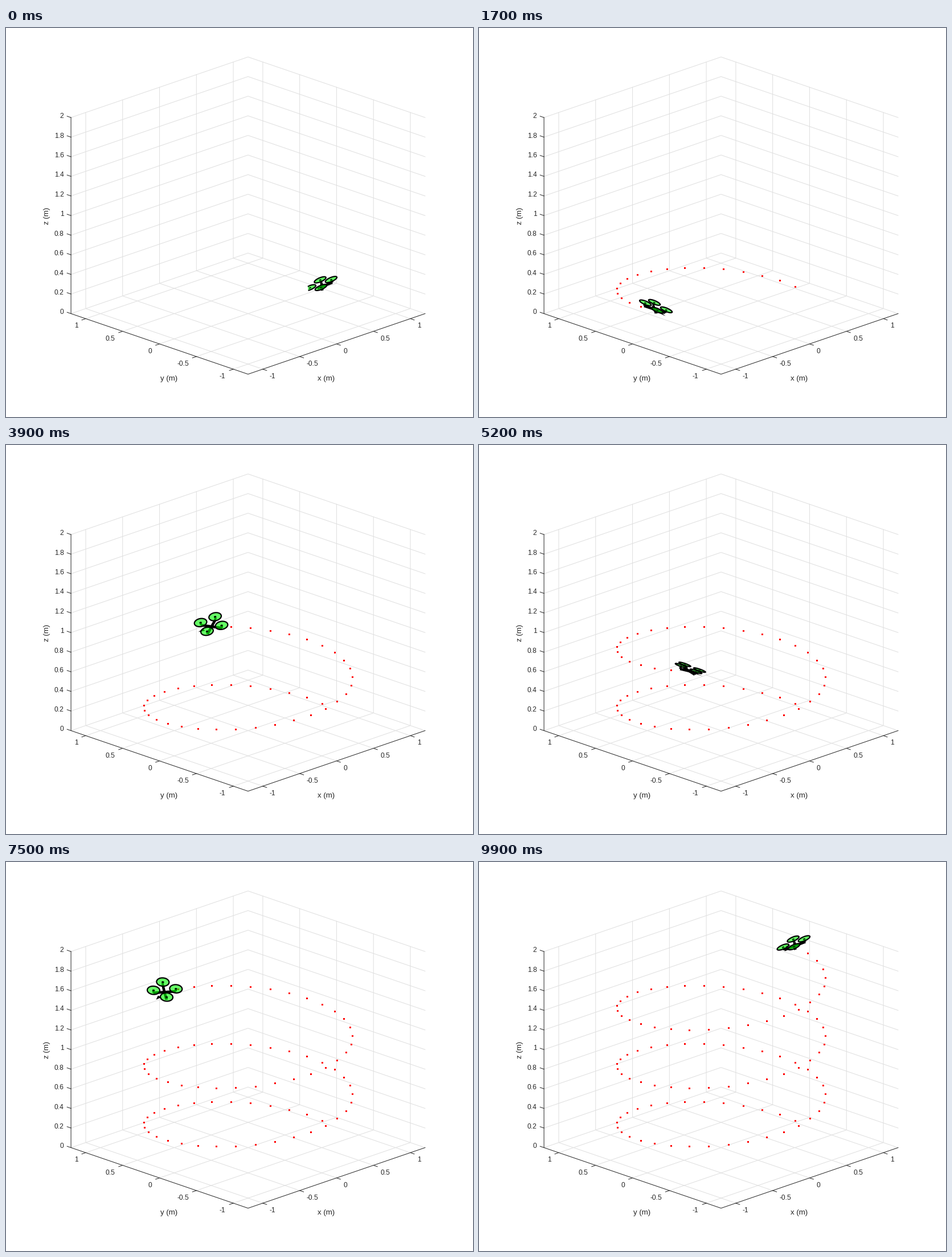
Recreate the animation shown at these times as a matplotlib script. Size 820 by 683 pixels, loop 10 s.

```python
import numpy as np
import matplotlib.pyplot as plt
from matplotlib.animation import FuncAnimation
from matplotlib.patches import Polygon

W, H, DPI = 820, 683, 64
PX = 72 / DPI                      # one pixel in points
FRAMES, TURN = 100, 33             # frames per loop, frames per circle
SCALE, ELEV = 183.2, np.radians(20)
LIM, TOP = 1.2, 2.0
TILT = np.radians(15.5)
ARM, RADIUS, LIFT = 0.109, 0.06, 0.033
INK, GRID = "#262626", "#dfdfdf"

plt.rcParams["font.family"] = "Liberation Sans"
fig = plt.figure(figsize=(W / DPI, H / DPI), dpi=DPI, facecolor="white")
ax = fig.add_axes([0, 0, 1, 1])
ax.set_xlim(-0.5, W - 0.5)
ax.set_ylim(H - 0.5, -0.5)
ax.axis("off")

VIEW = np.array([-np.cos(ELEV) / 2**0.5, -np.cos(ELEV) / 2**0.5, np.sin(ELEV)])


def project(pts):
    """Orthographic view of world points (n, 3) as stage pixels (n, 2)."""
    x, y, z = np.asarray(pts, float).T
    side = (x - y) / 2**0.5
    up = (x + y) / 2**0.5 * np.sin(ELEV) + z * np.cos(ELEV)
    return np.column_stack([424.5 + SCALE * side, 501 - SCALE * up])


def line(pts, color, width, z=1, **kw):
    u, v = project(pts).T
    return ax.plot(u, v, color=color, lw=width * PX, zorder=z, **kw)[0]


def label(x, y, s, size=12, **kw):
    ax.text(x, y, s, fontsize=size * PX, color=INK, va="center", **kw)


def draw_axes():
    tick = 0.053
    for v in (-1, -0.5, 0, 0.5, 1):
        line([(v, -LIM, 0), (v, LIM, 0), (v, LIM, TOP)], GRID, 1)
        line([(-LIM, v, 0), (LIM, v, 0), (LIM, v, TOP)], GRID, 1)
        line([(v, -LIM, 0), (v, -LIM - tick, 0)], INK, 1, 2)
        line([(-LIM, v, 0), (-LIM - tick, v, 0)], INK, 1, 2)
        (xu, xv), (yu, yv) = project([(v, -LIM, 0), (-LIM, v, 0)])
        label(xu + 12, xv + 13, f"{v:g}", ha="left")
        label(yu - 13.5, yv + 13, f"{v:g}", ha="right")
    for v in np.linspace(0, TOP, 11):
        line([(-LIM, LIM, v), (LIM, LIM, v), (LIM, -LIM, v)], GRID, 1)
        line([(-LIM, LIM, v), (-LIM, LIM + tick, v)], INK, 1, 2)
        u, w = project([(-LIM, LIM, v)])[0]
        label(u - 12.5, w - 2, f"{v:g}", ha="right")
    line([(-LIM, LIM, TOP), (-LIM, LIM, 0), (-LIM, -LIM, 0), (LIM, -LIM, 0)],
         INK, 1, 2)
    label(562, 615, "x (m)", 13.3, ha="center")
    label(286, 615, "y (m)", 13.3, ha="center")
    label(71, 329, "z (m)", 13.3, ha="center", rotation=90)


def position(n):
    a = 2 * np.pi * np.asarray(n) / TURN
    return np.stack([np.cos(a), np.sin(a), 0.018 * (np.asarray(n) + 1)], -1)


def attitude(n):
    """Heading along the path, banked inward and pitched forward."""
    yaw = 2 * np.pi * n / TURN + np.pi / 2
    c, s = np.cos(yaw), np.sin(yaw)
    ct, st = np.cos(TILT), np.sin(TILT)
    rz = np.array([[c, -s, 0], [s, c, 0], [0, 0, 1]])
    ry = np.array([[ct, 0, st], [0, 1, 0], [-st, 0, ct]])
    rx = np.array([[1, 0, 0], [0, ct, st], [0, -st, ct]])
    return rz @ ry @ rx


def above_floor(pts):
    return np.where(pts[:, 2:] >= 0, pts, np.nan)


ROUND = np.linspace(0, 2 * np.pi, 73)
RIM = RADIUS * np.column_stack([np.cos(ROUND), np.sin(ROUND), 0 * ROUND])
ANGLES = np.pi / 4 + np.pi / 2 * np.arange(4)
TIPS = ARM * np.column_stack([np.cos(ANGLES), np.sin(ANGLES), 0 * ANGLES])
NOSE = np.array([(0.14, 0, 0), (0.08, 0.02, 0), (0.08, -0.02, 0)])
UP = np.array([0, 0, 1.0])

draw_axes()
trail, = ax.plot([], [], "s", color="red", ms=3 * PX, mew=0, zorder=3)
live = []


def fill(pts, color, z, **kw):
    pts = pts[pts[:, 2] >= 0]
    if len(pts) > 2:
        live.append(ax.add_patch(
            Polygon(project(pts), closed=True, fc=color, lw=0, zorder=z, **kw)))


def stroke(pts, width, z):
    live.append(line(above_floor(pts), "black", width, z,
                     solid_capstyle="butt", solid_joinstyle="round"))


def spikes(rim, z):
    """Sharp ends that the rim shows when seen edge-on."""
    uv = project(rim)
    ends = uv[[uv[:, 0].argmin(), uv[:, 0].argmax()]]
    d = ends[1] - ends[0]
    d /= np.hypot(*d)
    u, v = (ends + np.array([-5 * d, 5 * d])).T
    live.append(ax.plot(u, v, color="black", lw=1.3 * PX, zorder=z)[0])


def draw(n):
    while live:
        live.pop().remove()
    trail.set_data(*project(position(np.arange(n + 1))).T)

    rot, pos = attitude(n), position(n)

    def place(p):
        return np.asarray(p) @ rot.T + pos

    fill(place(NOSE), "black", 4)
    steps = np.linspace(0, 1, 25)[:, None]
    for tip in TIPS:
        stroke(place(steps * tip), 4.6, 5)
        stroke(place(tip + steps * LIFT * UP), 4, 5)

    facing = rot[:, 2] @ VIEW
    order = np.argsort((TIPS @ rot.T) @ VIEW)
    for k, tip in enumerate(TIPS[order]):
        z = 6 + k
        hub = tip + LIFT * UP
        rim = place(RIM + hub)
        fill(rim, "lime", z, alpha=0.6)
        stroke(rim, 2.2, z + 0.2)
        fill(place(RIM * 0.2 + hub), "black", z + 0.3)
        if abs(facing) < 0.01:
            spikes(rim, z + 0.4)
    return [trail, *live]


anim = FuncAnimation(fig, draw, frames=FRAMES, interval=100,
                     init_func=lambda: [], repeat=True)
plt.show()
```
